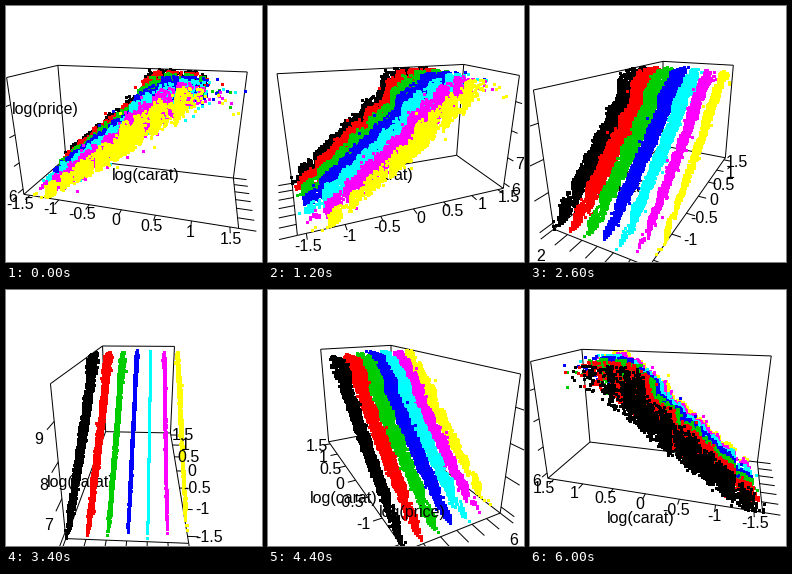
Write a matplotlib script that moves like this. It is 256 px wide and 256 px high and loops after 6100 ms.

```python
import numpy as np
import matplotlib.pyplot as plt
from matplotlib.animation import FuncAnimation
from matplotlib.collections import LineCollection

SIZE, DPI = 256, 64
PX = 72 / DPI                      # points per pixel
FRAMES, STEP, START = 61, 3, -15   # degrees per frame, first angle
FOCAL, TILT = 293, np.radians(20)
A, B, C = 0.353, 0.155, 0.201      # half sizes of the box, camera distance 1
COLORS = ["#000000", "#ff0000", "#00cd00", "#0000ff",
          "#00ffff", "#ff00ff", "#ffff00"]
COUNTS = [4700, 6900, 6700, 7900, 5800, 3800, 2000]
SIZES = np.array([.2, .23, .3, .4, .5, .6, .7, .8, .9, 1, 1.2, 1.5, 2, 2.5, 3.2])
SHARES = np.array([.1, 1.5, 8, 4, 5, 1, 5, 1, 2.5, 7, 3, 3, 1.6, .12, .02])
LOW, HIGH = 5.787, 9.843           # range of log(price)

rng = np.random.default_rng(7)


def to_x(carat):
    return np.asarray(carat) / 1.61 * A


def to_w(grade):
    return (4 - np.asarray(grade)) / 3 * B


def to_z(price):
    return (np.asarray(price) - 7.815) / 2.028 * C


def make_stones(grade, count):
    """Log carat and log price of the stones of one colour grade."""
    share = SHARES * SIZES ** (0.3 * (grade - 4))
    size = rng.choice(SIZES, count, p=share / share.sum())
    carat = size * np.exp(rng.exponential(0.07, count))
    x = np.minimum(np.log(np.round(carat, 2)), 1.61)
    # bounded spread, reaching higher from one carat on
    top = (0.8 + 0.45 * (x >= 0)) * (1 - 0.09 * (grade - 1))
    bottom = -0.7 + 0.03 * (grade - 1)
    noise = bottom + (top - bottom) * rng.beta(2.5, 3, count)
    noise += rng.normal(0, 0.3, count) * (rng.random(count) < 0.02)
    spread = np.clip(1 + 0.4 * (x + 0.35), 0.6, 1)
    mean = np.minimum(8.3 + 1.69 * x - 0.06 * (grade - 4), 9.55)
    price = mean + spread * noise
    keep = (price > LOW) & (price < HIGH)
    return to_x(x[keep]), to_z(price[keep])


def project(x, w, z, angle):
    """Box coordinates to pixels; w points away from the viewer at angle 0."""
    side = x * np.cos(angle) - w * np.sin(angle)
    away = x * np.sin(angle) + w * np.cos(angle)
    scale = FOCAL / (1 + away * np.cos(TILT) - z * np.sin(TILT))
    up = z * np.cos(TILT) + away * np.sin(TILT)
    return SIZE / 2 + side * scale, SIZE / 2 - up * scale


fig = plt.figure(figsize=(SIZE / DPI, SIZE / DPI), dpi=DPI, facecolor="white")
ax = fig.add_axes([0, 0, 1, 1])
ax.set_xlim(0, SIZE)
ax.set_ylim(SIZE, 0)
ax.axis("off")

frame_lines = LineCollection([], colors="black", linewidths=PX, zorder=1)
ax.add_collection(frame_lines)

planes = []
for grade, (color, count) in enumerate(zip(COLORS, COUNTS), 1):
    x, z = make_stones(grade, count)
    dots, = ax.plot([], [], "s", color=color, ms=3 * PX, mew=0)
    planes.append((dots, x, float(to_w(grade)), z))


def make_text(text):
    label = ax.text(0, 0, text, family="Liberation Sans", size=16 * PX,
                    ha="center", va="center", zorder=6)
    return label, label.get_window_extent().width / 2


carat_ticks = [(to_x(v), make_text(f"{v:g}")) for v in np.arange(-1.5, 1.6, 0.5)]
grade_ticks = [(to_w(v), make_text(str(v))) for v in range(1, 8)]
price_ticks = [(to_z(v), make_text(str(v))) for v in range(6, 10)]
titles = [(make_text("log(carat)"), np.array([0, 1.3 * B, -1.3 * C])),
          (make_text("log(price)"), np.array([-1.3 * A, 1.3 * B, 0]))]


def place_text(item, point, angle):
    """Text whose start lies off the stage is dropped as a whole."""
    label, half = item
    px, py = project(*point, angle)
    label.set_position((px, py))
    label.set_visible(bool(-0.6 <= px - half <= 248 and 0 <= py <= 256))


def axis_marks(ticks, axis, edge, outward, angle):
    """Place the labels of one axis and return its tick segments."""
    marks = []
    for value, item in ticks:
        foot = np.array(edge, float)
        foot[axis] = value
        marks.append([project(*foot, angle), project(*(foot + outward), angle)])
        place_text(item, foot + 2 * outward, angle)
    return marks


def box_edges(wx, ww):
    """Edges of the floor and of the two walls at x = wx and w = ww."""
    edges = []
    for z in (-C, C):
        edges.append([(wx, -ww, z), (wx, ww, z)])
        edges.append([(-wx, ww, z), (wx, ww, z)])
    edges.append([(-wx, -ww, -C), (wx, -ww, -C)])
    edges.append([(-wx, -ww, -C), (-wx, ww, -C)])
    for x, w in ((wx, ww), (wx, -ww), (-wx, ww)):
        edges.append([(x, w, -C), (x, w, C)])
    return edges


def update(i):
    angle = np.radians(START + STEP * i)
    sin, cos = np.sin(angle), np.cos(angle)
    wx = A if sin > 0 else -A
    ww = B if cos > 0 else -B
    out_x = np.array([-wx * 0.135, 0, 0])
    out_w = np.array([0, -ww * 0.18, 0])

    lines = [[project(*p, angle) for p in edge] for edge in box_edges(wx, ww)]
    lines += axis_marks(carat_ticks, 0, (0, -ww, -C), out_w, angle)
    lines += axis_marks(grade_ticks, 1, (-wx, 0, -C), out_x, angle)
    # the price axis stands on the nearer of the two outline edges
    if wx * sin - ww * cos < 0:
        lines += axis_marks(price_ticks, 2, (wx, -ww, 0), out_w, angle)
    else:
        lines += axis_marks(price_ticks, 2, (-wx, ww, 0), out_x, angle)
    frame_lines.set_segments(lines)

    eye = -np.cos(TILT) * cos
    for dots, x, w, z in planes:
        dots.set_data(*project(x, w, z, angle))
        dots.set_zorder(3.5 - abs(w - eye))

    for item, point in titles:
        place_text(item, point, angle)
        behind = point[0] * sin + point[1] * cos > 0
        item[0].set_zorder(1.2 if behind else 6)
    return []


anim = FuncAnimation(fig, update, frames=FRAMES, interval=100,
                     repeat=True, repeat_delay=0, blit=False)
plt.show()
```
